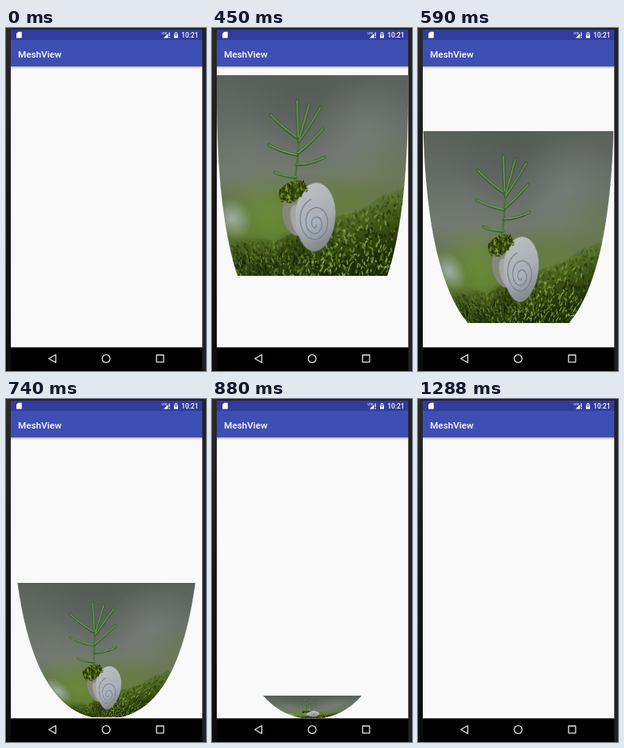
These frames come from a looping animation (250 px wide and 429 px high, 1460 ms). An HTML page with a canvas:

```html
<!DOCTYPE html>
<html lang="en">
<head>
<meta charset="utf-8">
<title>MeshView</title>
<style>
html, body { margin: 0; width: 100%; height: 100%; overflow: hidden; background: #1c1c1c; }
svg, canvas { position: absolute; left: 0; top: 0; width: 250px; height: 429px; }
text { font-family: Roboto, sans-serif; font-weight: 500; fill: #fff; }
</style>
</head>
<body>
<svg viewBox="0 0 250 429">
  <defs>
    <linearGradient id="side" x2="0" y2="1">
      <stop stop-color="#2a2a2a"/><stop offset=".5" stop-color="#161616"/><stop offset="1" stop-color="#0c0c0c"/>
    </linearGradient>
    <linearGradient id="shade" x2="0" y2="1">
      <stop stop-color="#000" stop-opacity=".28"/><stop offset="1" stop-color="#000" stop-opacity="0"/>
    </linearGradient>
  </defs>
  <rect width="250" height="429" fill="#222"/>
  <rect width="6" height="429" fill="url(#side)"/>
  <rect x="6" y="2" width="239.300" height="13" fill="#303d9d"/>
  <rect x="6" y="15" width="239.300" height="33" fill="#3e4fb4"/>
  <rect x="6" y="48" width="239.300" height="352" fill="#f9f9f9"/>
  <rect x="6" y="48" width="239.300" height="3" fill="url(#shade)"/>
  <rect x="6" y="399.400" width="239.300" height="29.600"/>
  <path d="M15.300 4.800H19.700V12.600H13V7z" fill="#fff"/>
  <text x="194.500" y="8.300" font-size="4.200">LTE</text>
  <path d="M197 12.500L202.500 7V12.500z" fill="#fff"/>
  <path d="M203.500 5.500h1.500v4.500h-1.500zM203.500 11h1.500v1.500h-1.500z" fill="#d5d8ee"/>
  <path d="M210 6h1.500V5h2v1h1.500v6.500h-5z" fill="#fff"/>
  <path d="M210 6h5v2.500h-5z" fill="#8f97cb"/>
  <path d="M212.700 7l-1.500 2.500h1.200l-.4 2 1.600-2.600h-1.200z" fill="#303d9d"/>
  <text x="219.300" y="12" font-size="8.300">10:21</text>
  <text x="15" y="36.500" font-size="11.700">MeshView</text>
  <g fill="none" stroke="#e4e4e4" stroke-width="1.300" stroke-linejoin="round">
    <path d="M53.500 413.500l8.700-5v10z"/>
    <circle cx="125.200" cy="413.500" r="4.900"/>
    <rect x="188.200" y="409" width="8.800" height="8.800"/>
  </g>
</svg>
<canvas width="250" height="429"></canvas>
<script>
const W = 240, H = 256, END = 400, MID = 125.5;
const view = document.querySelector('canvas').getContext('2d');
const photo = document.createElement('canvas');
photo.width = W;
photo.height = H;
const p = photo.getContext('2d');

let seed = 7;
const rand = () => (seed = seed * 16807 % 2147483647) / 2147483647;
const pick = list => list[Math.floor(rand() * list.length)];

function blend(gradient, stops) {
  stops.forEach(([at, color]) => gradient.addColorStop(at, color));
  return gradient;
}

function glow(x, y, r, rgb, a) {
  p.fillStyle = blend(p.createRadialGradient(x, y, 0, x, y, r), [[0, `rgba(${rgb},${a})`], [1, `rgba(${rgb},0)`]]);
  p.fillRect(0, 0, W, H);
}

function oval(x, y, rx, ry, tilt, fill) {
  p.fillStyle = fill;
  p.beginPath();
  p.ellipse(x, y, rx, ry, tilt, 0, 7);
  p.fill();
}

function curve(x, y, cx, cy, tx, ty, width, color) {
  p.lineWidth = width;
  p.strokeStyle = color;
  p.beginPath();
  p.moveTo(x, y);
  p.quadraticCurveTo(cx, cy, tx, ty);
  p.stroke();
}

function tuft(x, y, size, colors) {
  p.strokeStyle = pick(colors);
  p.beginPath();
  p.moveTo(x, y);
  p.lineTo(x + (rand() - .5) * size, y - rand() * size);
  p.stroke();
}

// A leaf from (x, y) to (tx, ty), sagging by bend, lit along its upper side
function leaf(x, y, tx, ty, bend) {
  const cx = (x + tx) / 2, cy = (y + ty) / 2 + bend;
  curve(x, y, cx, cy, tx, ty, 3.4, '#315427');
  curve(x, y - .6, cx, cy - .6, tx, ty, 1.5, '#789d63');
}

const ground = x => 213 - 75 * (x / W) ** 2;

function paintPhoto() {
  p.lineCap = 'round';
  p.fillStyle = blend(p.createLinearGradient(0, 0, 0, H), [[0, '#5a625b'], [.28, '#666e67'], [.48, '#717a6c'],
    [.6, '#677750'], [.78, '#5f7b35'], [1, '#35450f']]);
  p.fillRect(0, 0, W, H);
  glow(110, 15, 90, '78,88,80', .6);
  glow(185, 75, 70, '126,132,128', .6);
  glow(35, 110, 60, '116,124,116', .5);
  glow(60, 175, 60, '108,150,48', .6);
  glow(170, 160, 55, '104,132,58', .6);
  glow(12, 182, 26, '168,184,184', .85);
  glow(225, 120, 55, '104,120,76', .6);

  // Mossy ground, blurred where it meets the background
  p.fillStyle = blend(p.createLinearGradient(100, 165, 130, H),
    [[0, '#5f7b3500'], [.4, '#4d6822'], [.75, '#33480f'], [1, '#1f2d08']]);
  p.beginPath();
  p.moveTo(0, H);
  for (let x = 0; x <= W; x += 4) p.lineTo(x, ground(x) + 3 * Math.sin(x / 9));
  p.lineTo(W, H);
  p.fill();
  p.lineWidth = 1.8;
  for (let i = 0; i < 1300; i++) {
    const x = rand() * W, depth = rand(), y = ground(x) + depth * (H - ground(x)) + 2;
    p.globalAlpha = Math.min(1, .3 + depth * 1.4);
    tuft(x, y, 5, ['#17220a', '#22330a', '#34490f', '#4d6a1c', '#6f9130', '#93ad50']);
  }
  p.globalAlpha = 1;
  glow(35, 262, 60, '18,28,4', .6);
  glow(95, 225, 30, '22,32,6', .6);

  // Shell
  oval(97, 179, 17, 25, -.2, '#85877f');
  oval(100, 184, 9, 20, -.2, '#a5a69e');
  oval(124, 180, 27, 44, .04, blend(p.createLinearGradient(105, 140, 145, 220),
    [[0, '#bcc0c0'], [.5, '#a9afb6'], [1, '#7d8486']]));
  glow(120, 190, 22, '176,190,210', .5);
  p.strokeStyle = '#727a80';
  p.lineWidth = 1.2;
  p.beginPath();
  for (let a = 0; a < 17; a += .2) {
    const r = 1 + a * 1.25;
    p.lineTo(124 + r * Math.cos(a), 190 - a * .35 + r * 1.25 * Math.sin(a));
  }
  p.stroke();

  // Moss cap
  oval(94, 146, 19, 11, -.45, '#354a0c');
  p.lineWidth = 1.5;
  for (let i = 0; i < 150; i++) {
    const a = rand() * 6.3, r = Math.sqrt(rand());
    tuft(94 + 18 * r * Math.cos(a), 149 + 12 * r * Math.sin(a) - 5 * Math.cos(a), 5, ['#1c2a06', '#34490a', '#587519', '#88a436']);
  }

  // Sapling
  curve(97, 134, 104, 100, 102, 60, 2.6, '#4d7040');
  [[102, 80, 68, 50, 4], [101, 101, 65, 88, 4], [99, 129, 72, 123, 3],
   [102, 78, 101, 32, 0], [103, 82, 116, 36, 2], [103, 84, 130, 41, 3],
   [102, 99, 133, 68, 3], [100, 113, 135, 104, 5]].forEach(l => leaf(...l));
}

// Left edge of the funnel and the length along it
const edge = y => 6 + 119.5 * Math.max(0, 1 - Math.sqrt((END - y) / 315)) ** 2;
const along = [0];
for (let y = 1; y <= END; y++) along[y] = along[y - 1] + Math.hypot(1, edge(y) - edge(y - 1));

function drawMesh(top, bottom) {
  const span = along[bottom] - along[top];
  const row = y => (along[y] - along[top]) / span * H;
  view.save();
  view.beginPath();
  for (let y = top; y <= bottom; y++) view.lineTo(edge(y), y);
  for (let y = bottom; y >= top; y--) view.lineTo(2 * MID - edge(y), y);
  view.clip();
  for (let y = top; y < bottom; y++) {
    const x = edge(y) - 1;
    view.drawImage(photo, 0, row(y), W, row(y + 1) - row(y), x, y, 2 * (MID - x), 1);
  }
  view.restore();
}

// Start time, top and bottom of the sheet
const poses = [[0, 0, 0], [450, 59, 310], [590, 129, 369], [740, 230, 398], [880, 371, 399], [1030, 0, 0]];
const start = performance.now();
let shown;

function tick() {
  const t = (performance.now() - start) % 1460;
  const pose = poses.findLast(q => q[0] <= t);
  if (pose !== shown) {
    shown = pose;
    view.clearRect(0, 0, 250, 429);
    drawMesh(pose[1], pose[2]);
  }
  requestAnimationFrame(tick);
}

paintPhoto();
tick();
</script>
</body>
</html>
```
